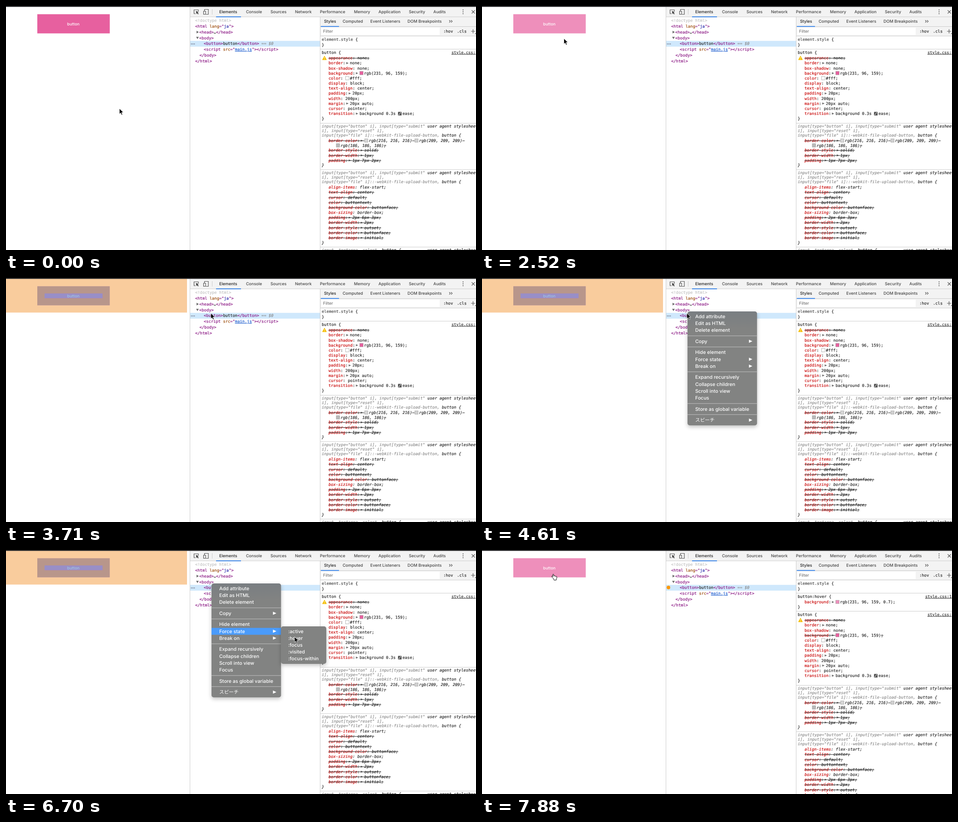
These frames come from a looping animation (1036 by 540 pixels, 8 s). An HTML page:

```html
<!DOCTYPE html>
<html lang="en">
<head>
<meta charset="utf-8">
<title>Forcing the hover state</title>
<style>
html, body { margin: 0; width: 100%; height: 100%; overflow: hidden; background: #fff; }
svg { display: block; width: 100%; height: 100%; }
text { white-space: pre; text-rendering: geometricPrecision; color: #222; fill: currentColor; }
.mono { font: 8.8px "DejaVu Sans Mono", monospace; stroke: currentColor; stroke-width: .18; }
.ui { font: 500 9px Inter, sans-serif; }
.menu text { font: 500 10.65px Inter, "Noto Sans CJK JP", "Noto Sans CJK", sans-serif; color: #fff; }
.caption { font: 500 8.9px Inter, sans-serif; color: #fff; text-anchor: middle; }
.italic, .ua text { font-style: italic; }
.dim { color: #444; }
.hint { color: #757575; }
.grey { color: #888; }
.pale { color: #c0c0c0; }
.tag { color: #881280; }
.attr { color: #994500; }
.val { color: #1a1aa6; }
.link { color: #15c; text-decoration: underline; }
.file { color: #333; text-decoration: underline; }
.name { color: #c80000; }
.strike { stroke: #222; stroke-width: .95; }
.rule { stroke: #ccc; }
.icon { fill: none; stroke: #555; stroke-width: 1.2; }
</style>
</head>
<body>
<svg id="stage" viewBox="0 0 1036 540"></svg>
<script>
const CHAR = 8.8 * 0.602;
const esc = s => s.replace(/&/g, '&amp;').replace(/</g, '&lt;');
const rect = (x, y, w, h, fill, more = '') =>
  `<rect x="${x}" y="${y}" width="${w}" height="${h}" fill="${fill}" ${more}/>`;
const line = (x1, y1, x2, y2, cls) =>
  `<line x1="${x1}" y1="${y1}" x2="${x2}" y2="${y2}" class="${cls}"/>`;
const path = (d, attrs) => `<path d="${d}" ${attrs}/>`;
const group = (id, body, attrs = '') => `<g id="${id}" ${attrs}>${body}</g>`;
const label = (x, y, text, cls = '') => `<text x="${x}" y="${y}" class="${cls}">${esc(text)}</text>`;
const ui = (x, y, text, cls = '') => label(x, y, text, 'ui ' + cls);

// Monospace line made of [class, text] runs, y is the middle of the line
const mono = (x, y, ...runs) => `<text x="${x}" y="${y + 3}" class="mono">` +
  runs.map(([cls, text]) => `<tspan class="${cls}">${esc(text)}</tspan>`).join('') + '</text>';
const arrowRight = (x, y, w, h, fill) =>
  path(`M${x} ${y - h / 2}l${w} ${h / 2}l${-w} ${h / 2}z`, `fill="${fill}"`);

function swatch(x, y, color) {
  if (color !== 'curve') return rect(x + .5, y - 4, 7.5, 7.5, color, 'stroke="#999" stroke-width=".7"');
  return rect(x, y - 4, 8, 8, '#555', 'rx="1"') +
    path(`M${x + 1} ${y + 2.5}c4 0 2-5 6-5`, 'fill="none" stroke="#fff"');
}

// Value text; [color] is a swatch, rgb() parts stay free of the strike
function value(x, y, text, struck) {
  let out = '';
  for (const part of text.split(/(\[.*?\]|rgb\(.*?\))/).filter(Boolean)) {
    if (part[0] === '[') {
      out += swatch(x, y, part.slice(1, -1));
      x += 10;
      continue;
    }
    const end = x + part.length * CHAR;
    out += mono(x, y, ['', part]);
    if (struck && !part.startsWith('rgb')) out += line(x, y + .3, end, y + .3, 'strike');
    x = end;
  }
  return out;
}

// "~" marks an overridden property, ">" an expandable one
function prop(y, spec) {
  const struck = spec[0] === '~';
  const [, name, open, text] = spec.match(/^~?([\w-]+):(>?)(.*)$/);
  const x = 711, nameEnd = x + (name.length + 1) * CHAR;
  const start = nameEnd + (open ? 10 : CHAR);
  return mono(x, y, ['name', name], ['', ':']) +
    (open ? arrowRight(nameEnd + 2, y, 5, 4.6, '#6e6e6e') : '') +
    (struck ? line(x, y + .3, start, y + .3, 'strike') : '') +
    value(start, y, text + (text.endsWith(')') && name === 'border-color' ? ' ' : ';'), struck);
}
const props = (y, specs) => specs.map((s, i) => prop(y + i * 11.18, s)).join('');
const brace = y => mono(696, y, ['', '}']);
const divider = y => line(693, y, 1036, y, 'rule');
const agentSelector = y =>
  mono(696, y, ['grey', 'input[type="button" i], input[type="submit"']) +
  mono(929, y, ['', 'user agent stylesheet']) +
  mono(696, y + 10.3, ['grey', 'i], input[type="reset" i],']) +
  mono(696, y + 20.7, ['grey', 'input[type="file" i]::-webkit-file-upload-button, '], ['', 'button {']);

const page =
  rect(69, 18.2, 159.7, 42.4, '#e7609f', 'id="button"') +
  label(148.5, 43.3, 'button', 'caption') +
  group('overlay',
    path('M0 2H399V76.6H0zM69 18.2V60.6H228.7V18.2z', 'fill="rgba(246,178,107,.66)"') +
    path('M69 18.2H228.7V60.6H69zM85 34.2V44.7H212.8V34.2z', 'fill="rgba(147,196,125,.55)"') +
    rect(85, 34.2, 127.8, 10.5, 'rgba(111,168,220,.66)'));

const tabs = [['Console', 529], ['Sources', 583], ['Network', 637], ['Performance', 692],
  ['Memory', 767], ['Application', 821], ['Security', 888], ['Audits', 942]];
const sideTabs = [['Computed', 742], ['Event Listeners', 803], ['DOM Breakpoints', 885]];
const toolbar =
  rect(406, 2, 630, 22, '#f3f3f3') + rect(693, 24, 343, 42, '#f3f3f3') +
  path('M424 12V8.5H414.5V17H418', 'class="icon"') +
  path('M418.5 11l6.5 2.6-2.7 1 2.4 2.6-1.2 1.2-2.5-2.5-1 2.4z', 'fill="#444"') +
  path('M437.5 11V7.5H446V18.5H441M435.5 11.5H440V18.5H435.5z', 'class="icon"') +
  line(454.5, 7, 454.5, 19, 'rule') +
  ui(470, 16, 'Elements') + tabs.map(([t, x]) => ui(x, 16, t, 'dim')).join('') +
  [8.7, 12.9, 17.1].map(y => `<circle cx="1007.5" cy="${y}" r="1.1" fill="#5a5a5a"/>`).join('') +
  path('M1026.5 9.5l7 7m0-7l-7 7', 'class="icon"') +
  line(406, 24, 1036, 24, 'rule') + rect(463, 23.2, 55, 1.6, '#1a73e8') +
  ui(701, 37.3, 'Styles') + sideTabs.map(([t, x]) => ui(x, 37.3, t, 'dim')).join('') +
  path('M977 31.5l2.6 2.6-2.6 2.6m4-5.2l2.6 2.6-2.6 2.6', 'class="icon"') +
  line(693, 45.5, 1036, 45.5, 'rule') + rect(694, 44.5, 40, 1.6, '#1a73e8') +
  rect(695, 48, 261, 16, '#fff') + ui(699, 59, 'Filter', 'hint') +
  mono(964, 56, ['', ':hov']) + mono(994, 56, ['', '.cls']) +
  path('M1025 56h9m-4.5-4.5v9', 'class="icon"') + path('M1036 59.5v2.5h-2.5z', 'fill="#5a5a5a"') +
  divider(66.5);

const tree =
  rect(406, 77.2, 286, 12.7, '#cfe8fc') +
  mono(417, 32, ['pale', '<!doctype html>']) +
  mono(417, 45, ['tag', '<html '], ['attr', 'lang'], ['tag', '="'], ['val', 'ja'], ['tag', '">']) +
  arrowRight(420, 57.7, 5, 6, '#6e6e6e') +
  mono(426, 57.7, ['tag', '<head>'], ['', '…'], ['tag', '</head>']) +
  path('M419 68.3h6l-3 5z', 'fill="#6e6e6e"') +
  mono(426, 70.5, ['tag', '<body>']) +
  mono(436, 83.3, ['tag', '<button>'], ['', 'button'], ['tag', '</button>'], ['grey italic', ' == $0']) +
  mono(436, 96, ['tag', '<script '], ['attr', 'src'], ['tag', '="'], ['link', 'main.js'], ['tag', '"></' + 'script>']) +
  mono(426.5, 108.8, ['tag', '</body>']) +
  mono(417, 121.6, ['tag', '</html>']) +
  group('dots', [408.7, 412, 415.3].map(x => `<circle cx="${x}" cy="84" r="1" fill="#667"/>`).join('')) +
  '<circle id="forced" cx="411" cy="83" r="3.9" fill="#ff9800"/>';

const authorRule =
  mono(696, 102.5, ['', 'button {']) + mono(982, 102.5, ['file', 'style.css:']) +
  path('M702 110.8l4.4 8.2h-8.8z', 'fill="#f4bd00" stroke="#f4bd00" stroke-linejoin="round"') +
  path('M702 113v3m0 1v1.2', 'stroke="#fff"') +
  props(115.2, ['~appearance:none', 'border:>none', 'box-shadow:none']) +
  group('plainBackground', prop(148.7, 'background:>[#e7609f]rgb(231, 96, 159)')) +
  group('struckBackground', prop(148.7, '~background:>[#e7609f]rgb(231, 96, 159)')) +
  props(159.9, ['color:[#fff]#fff', 'display:block', 'text-align:center', 'padding:>20px',
    'width:200px', 'margin:>20px auto', 'cursor:pointer', 'transition:>background 0.3s [curve]ease']) +
  brace(249) + divider(259.5);

const agentRules =
  agentSelector(265.5) +
  prop(298, '~border-color:>[#d8d8d8]rgb(216, 216, 216) [#d1d1d1]rgb(209, 209, 209)') +
  value(727.5, 308.7, '[#bababa]rgb(186, 186, 186);', true) +
  props(319.4, ['~border-style:>solid', '~border-width:>1px', '~padding:>1px 7px 2px']) +
  brace(352) + divider(362) +
  agentSelector(368.6) +
  props(401.2, ['align-items:flex-start', '~text-align:center', '~cursor:default', '~color:buttontext',
    '~background-color:buttonface', 'box-sizing:border-box', '~padding:>2px 6px 3px',
    '~border-width:>2px', '~border-style:>outset', '~border-color:>buttonface', '~border-image:>initial']) +
  brace(524) + divider(533.5) +
  mono(696, 540, ['grey', 'input, textarea, select, '], ['', 'button {']) +
  mono(929, 540, ['', 'user agent stylesheet']);

const styles =
  mono(696, 73.5, ['dim', 'element.style'], ['', ' {']) + brace(86) + divider(95.5) +
  group('hoverRule',
    mono(696, 102.5, ['', 'button:hover {']) + mono(977, 102.5, ['file', 'style.css:1']) +
    prop(115.2, 'background:>[#ee90bc]rgb(231, 96, 159, 0.7)') + brace(126.3) + divider(135.5)) +
  group('rules', authorRule + group('agent', agentRules, 'class="ua"'));

const HALF_ROW = 7.6;
const menuGroups = [['Add attribute', 'Edit as HTML', 'Delete element'], ['Copy>'],
  ['Hide element', 'Force state>', 'Break on>'],
  ['Expand recursively', 'Collapse children', 'Scroll into view', 'Focus'],
  ['Store as global variable'], ['スピーチ>']];
const rows = [];
let menuText = '', rowY = 85.2;
menuGroups.forEach((items, i) => {
  if (i) {
    menuText += rect(453, rowY - 12.9, 153, 1.3, '#b3b3b3');
  }
  for (const item of items) {
    rows.push(rowY);
    menuText += label(470, rowY + 3.6, item.replace('>', ''));
    if (item.endsWith('>')) menuText += arrowRight(588.5, rowY - .2, 7.5, 7, '#fff');
    rowY += 15.2;
  }
  rowY += 9.4;
});
const subRows = [0, 1, 2, 3, 4].map(i => 180 + i * 15.15);
const panel = (x, y, w, h, fill) => rect(x, y, w, h, fill, 'rx="5" filter="url(#shadow)"');
const bar = (id, x, w) => rect(x, 0, w, HALF_ROW * 2, '#4a9bfb', `id="${id}"`);
const menus =
  group('menu', panel(453, 74, 153.3, 252.3, 'url(#tint)') + bar('menuBar', 453, 153.3) + menuText, 'class="menu"') +
  group('submenu', panel(606, 169, 100, 83, '#828382') + bar('subBar', 606, 100) +
    [':active', ':hover', ':focus', ':visited', ':focus-within']
      .map((t, i) => label(622, subRows[i] + 3.7, t)).join(''), 'class="menu"');

const cursor =
  path('M0 0V12.2L2.8 9.6 4.8 14.2 6.9 13.3 4.9 8.8 8.7 8.5Z',
    'id="arrow" fill="#000" stroke="#fff" stroke-width=".8"') +
  path('M-.8 8.6L-3.2 6.2Q-4 4.9-2.8 4.5-2 4.4-.6 6L-1 1.8Q-1 .5 0 .5 1 .5 1.2 1.8L1.8 4.6Q3 3.8 3.8 4.9 5 4.3 5.8 5.4 7.6 4.9 8 6.7L7.7 9.5Q7.5 11 6.7 12V13.6H1.6L1.4 12.3Z',
    'id="hand" fill="#fff" stroke="#000" stroke-width="1" stroke-linejoin="round"');

document.getElementById('stage').innerHTML =
  '<defs><filter id="shadow" x="-20%" y="-20%" width="140%" height="150%">' +
  '<feDropShadow dx="0" dy="3.5" stdDeviation="4" flood-opacity=".24"/></filter>' +
  '<linearGradient id="tint" x2="0" y2="1"><stop stop-color="#797e82"/>' +
  '<stop offset=".15" stop-color="#828382"/></linearGradient></defs>' +
  rect(0, 0, 1036, 540, '#fff') + page + tree + styles + toolbar +
  line(405.5, 2, 405.5, 540, 'rule') + line(692.5, 24, 692.5, 540, 'rule') +
  rect(0, 0, 1036, 2, '#2d2d2f') + menus + group('cursor', cursor);

const LOOP = 8000, SHORT_TICKS = [2, 4, 7, 25, 45, 48, 50];
const MENU = 31, MENU_MOVE = 33, FORCE_STATE = 37, SUBMENU = 38, BLINK = 45, CLOSED = 46;
const tickTime = n => 150 * n - 10 * SHORT_TICKS.filter(t => t <= n).length;

// [tick, x, y] of the pointer tip
const route = [[1, 250, 227], [5, 158, 56], [7, 152, 46], [8, 166, 71], [9, 172, 103], [10, 168, 84],
  [12, 166, 46], [13, 166, 46], [16, 172, 50], [17, 180.5, 72], [19, 190, 146], [20, 190, 146],
  [25, 451.5, 78], [32, 451.5, 78], [37, 496.5, 177.5], [39, 496.5, 177.5], [42, 618, 184],
  [43, 636, 192], [46, 636, 192], [51, 157, 66], [52, 157, 66], [53, 157, 53]];

function pointer(n) {
  const i = route.findIndex(p => p[0] >= n);
  if (i < 0) return route[route.length - 1].slice(1);
  if (i === 0) return route[0].slice(1);
  const [t0, x0, y0] = route[i - 1], [t1, x1, y1] = route[i];
  const k = (n - t0) / (t1 - t0);
  return [x0 + (x1 - x0) * k, y0 + (y1 - y0) * k];
}
const overButton = n => {
  const [x, y] = pointer(n);
  return x > 69 && x < 229 && y > 18 && y < 61;
};
const hovered = n => +(n >= CLOSED || overButton(n));

const $ = id => document.getElementById(id);
const show = (id, on) => { $(id).style.display = on ? '' : 'none'; };
function highlight(id, ys, y, on) {
  const row = ys.find(r => Math.abs(r - y) <= HALF_ROW);
  show(id, on && row !== undefined);
  if (row !== undefined) $(id).setAttribute('y', row - HALF_ROW);
}

function draw(n) {
  const [x, y] = pointer(n), forced = n >= CLOSED, hand = overButton(n);
  // A 0.3s ease spans two ticks: 80% after the first, complete after the second
  const level = .8 * hovered(n - 1) + .2 * hovered(n - 2);
  $('button').setAttribute('fill-opacity', 1 - .3 * level);
  show('overlay', n >= 25 && !forced);
  show('menu', n >= MENU && !forced);
  show('submenu', n >= SUBMENU && !forced);
  highlight('menuBar', rows, n >= FORCE_STATE ? rows[5] : y, n >= MENU_MOVE);
  highlight('subBar', subRows, y, x > 606 && n < BLINK);
  show('dots', !forced);
  show('forced', forced);
  show('hoverRule', forced);
  show('plainBackground', !forced);
  show('struckBackground', forced);
  $('rules').setAttribute('transform', `translate(0 ${forced ? 40 : 0})`);
  show('arrow', !hand);
  show('hand', hand);
  $('cursor').setAttribute('transform', `translate(${x} ${y})`);
}

const begin = performance.now();
let shown = -1;
function frame() {
  const t = (performance.now() - begin) % LOOP;
  let n = Math.floor(t / 150);
  while (tickTime(n + 1) <= t) n++;
  if (n !== shown) draw(shown = n);
  requestAnimationFrame(frame);
}
frame();
</script>
</body>
</html>
```
